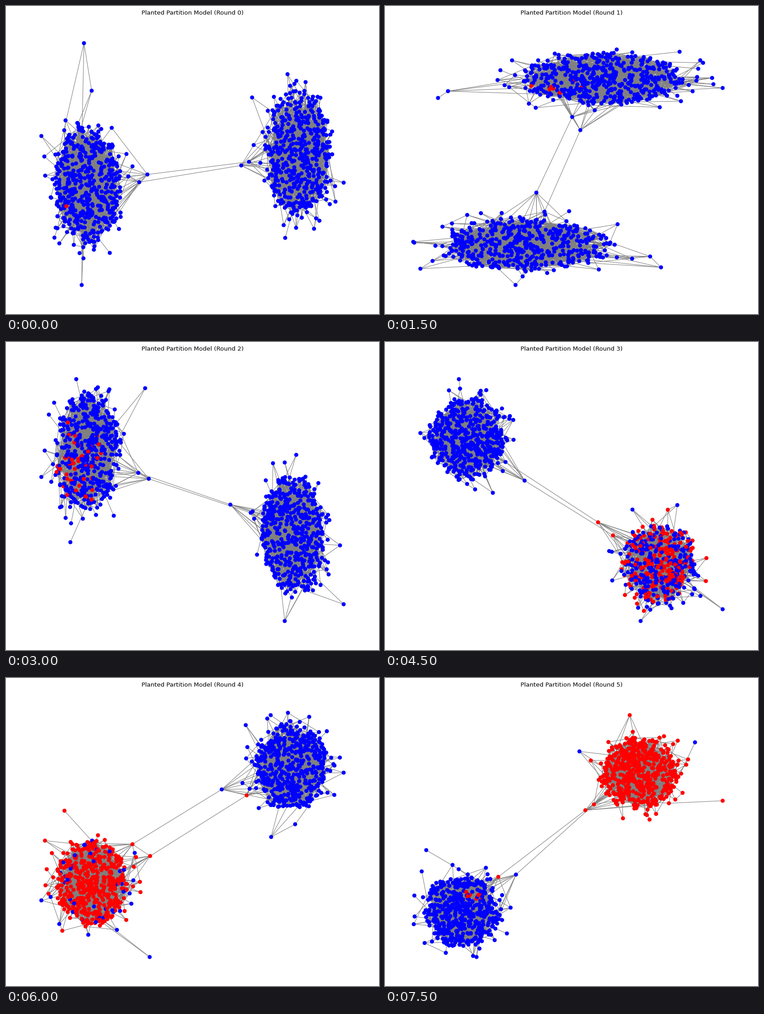
A matplotlib script that plays this animation: 823 by 680 pixels, repeating every 8000 ms.

```python
import numpy as np
import matplotlib.pyplot as plt
from matplotlib.animation import FuncAnimation
from matplotlib.collections import LineCollection

W, H, DPI = 823, 680, 80
NODES, FRINGE = 500, 26            # nodes per community, of which stray ones
TINT = {"b": "blue", "r": "red"}


def scatter_nodes(rng):
    """Nearly even disc of unit radius with a loose fringe."""
    r = rng.random(NODES) ** 0.54 * rng.normal(1, 0.04, NODES)
    r[:FRINGE] = 1.02 + 0.36 * rng.random(FRINGE) ** 1.3
    a = rng.uniform(0, 2 * np.pi, NODES)
    return np.column_stack([r * np.cos(a), r * np.sin(a)])


def link_nodes(unit, gates, rng):
    """Index pairs: each node prefers near nodes that lie further inside."""
    rho = np.hypot(*unit.T)
    pairs = []
    for i, p in enumerate(unit):
        if i in gates:
            degree, reach = 9, 0.45
        elif rho[i] > 1:
            degree, reach = rng.integers(1, 5), 0.4
        else:
            degree, reach = 5, 0.6
        weight = np.exp(-np.hypot(*(unit - p).T) / reach) * (rho < max(rho[i], 0.6))
        weight[i] = 0
        targets = rng.choice(len(unit), degree, replace=False, p=weight / weight.sum())
        pairs += [(i, j) for j in targets]
    return pairs


def infect(unit, red, source, rng):
    """The given share turns red, nodes close to the source sooner."""
    origin = unit[-1] if source else np.zeros(2)
    delay = rng.random(len(unit)) + 0.3 * np.hypot(*(unit - origin).T)
    if source:
        delay[-1] = -1
    return np.argsort(np.argsort(delay)) < round(red * NODES)


def community(center, radii, gates, tips, red=0.0, hue="bb", source=None):
    """gates lead to the other community, tips are its farthest nodes."""
    rng = np.random.default_rng(sum(center))
    special = np.array(gates + tips + ([source] if source else []), float)
    unit = np.vstack([scatter_nodes(rng), (special - center) / radii])
    pos = center + unit * radii
    gate_ids = range(NODES, NODES + len(gates))
    edges = pos[np.array(link_nodes(unit, gate_ids, rng))]

    color = np.where(infect(unit, red, source, rng), "red", "blue")
    for i, h in zip(gate_ids, hue):
        color[i] = TINT[h] if h == "r" else "blue"
    return pos, color, edges


def build_round(radii, one, two):
    """Two communities, joined by an edge between matching gates."""
    radii = np.array(radii, float)
    p1, c1, e1 = community(radii=radii, **one)
    p2, c2, e2 = community(radii=radii, **two)
    bridges = np.stack([one["gates"], two["gates"]], axis=1)
    return np.vstack([p1, p2]), np.append(c1, c2), np.vstack([e1, e2, bridges])


rounds = [
    build_round(
        (74, 134),
        dict(center=(180, 396), gates=[(312, 372), (294, 389)],
             tips=[(172, 82), (189, 187), (78, 287), (167, 616)],
             red=1 / NODES, source=(133, 442)),
        dict(center=(645, 324), gates=[(536, 344), (519, 352)],
             tips=[(543, 202), (661, 168), (745, 390), (616, 512)])),
    build_round(
        (184, 58),
        dict(center=(482, 160), gates=[(413, 245), (431, 274)],
             tips=[(117, 203), (139, 188), (745, 181), (650, 101)],
             red=0.016, source=(363, 184)),
        dict(center=(312, 527), gates=[(334, 412), (352, 454)],
             tips=[(78, 580), (288, 616), (585, 553), (609, 577)])),
    build_round(
        (70, 130),
        dict(center=(180, 243), gates=[(292, 289), (315, 302)],
             tips=[(155, 82), (307, 102), (78, 298), (142, 442)],
             red=0.1, source=(152, 280)),
        dict(center=(632, 423), gates=[(495, 359), (540, 377)],
             tips=[(615, 266), (737, 449), (745, 579), (615, 616)])),
    build_round(
        (82, 89),
        dict(center=(182, 215), gates=[(266, 265), (308, 306)],
             tips=[(163, 82), (283, 172), (78, 201), (238, 333)]),
        dict(center=(604, 490), gates=[(470, 398), (503, 427)],
             tips=[(546, 370), (645, 360), (564, 616), (745, 590)],
             red=0.45, hue="rr")),
    build_round(
        (81, 95),
        dict(center=(190, 452), gates=[(279, 367), (318, 393)],
             tips=[(129, 293), (86, 359), (78, 491), (317, 616)],
             red=0.92, hue="rr"),
        dict(center=(628, 196), gates=[(476, 246), (531, 259)],
             tips=[(529, 104), (584, 82), (745, 209), (585, 351)],
             hue="br")),
    build_round(
        (83, 79),
        dict(center=(168, 513), gates=[(250, 439), (289, 434)],
             tips=[(91, 380), (81, 427), (269, 564), (202, 616)],
             red=0.018, hue="rb", source=(206, 479)),
        dict(center=(562, 211), gates=[(442, 292), (461, 279)],
             tips=[(540, 82), (429, 162), (684, 142), (745, 271)],
             red=1.008, hue="rr")),
]

fig = plt.figure(figsize=(W / DPI, H / DPI), dpi=DPI, facecolor="white")
ax = fig.add_axes([0, 0, 1, 1])
ax.set(xlim=(0, W), ylim=(H, 0))
ax.axis("off")

links = LineCollection([], colors="gray", linewidths=1, zorder=1)
ax.add_collection(links, autolim=False)
dots = ax.scatter([], [], s=50, linewidths=1, zorder=2)
title = ax.text(412, 19.5, "", fontsize=12, family="DejaVu Sans",
                ha="center", va="baseline")


def update(step):
    n = step // 3                  # each round lasts three steps
    pos, color, edges = rounds[n]
    links.set_segments(edges)
    dots.set_offsets(pos)
    dots.set_facecolor(color)
    dots.set_edgecolor(color)
    title.set_text(f"Planted Partition Model (Round {n})")
    return links, dots, title


anim = FuncAnimation(fig, update, frames=16, interval=500, init_func=lambda: update(0),
                     repeat=True, blit=False)
plt.show()
```
